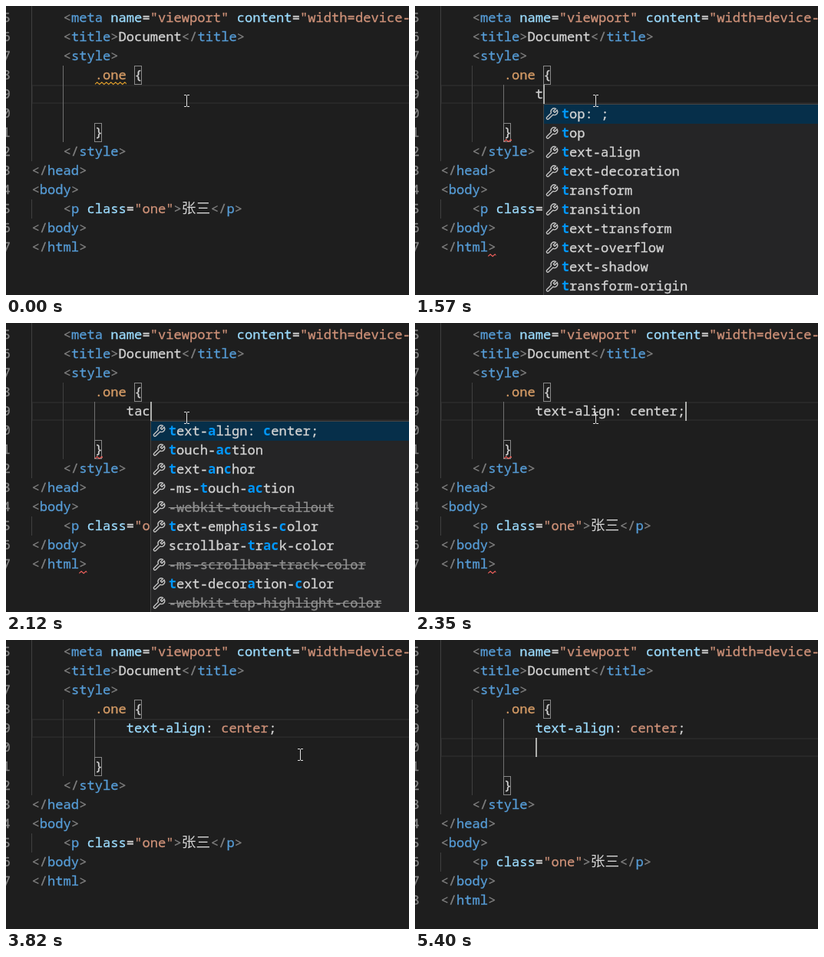
An HTML page with a canvas for the animation above (5530 ms loop, 525 by 378 pixels).

```html
<!DOCTYPE html>
<html lang="en">
<head>
<meta charset="utf-8">
<title>Code editor</title>
<style>
  html, body { margin: 0; width: 100%; height: 100%; overflow: hidden; background: #1e1e1e; }
  canvas { display: block; }
</style>
</head>
<body>
<canvas id="stage" width="525" height="378"></canvas>
<script>
const ctx = document.getElementById('stage').getContext('2d');
const LOOP = 5530, W = 525, H = 378;
const CELL = 10.28, LEFT = 33.5, ROW = 25, FIRST = 5;
const MONO = '17.13px "Noto Sans Mono", monospace';
const CJK = '18.7px "Noto Sans CJK SC", "Noto Sans CJK", sans-serif';
const COLORS = {
  g: '#808080', b: '#569cd6', a: '#9cdcfe', s: '#ce9178', o: '#d69c66', w: '#d4d4d4', c: '#d4d4d4'
};

// A code line: parts separated by "|", one colour key per part
const HEAD = [
  ['    <|meta| name|=|"viewport"| content|=|"width=device-width"', 'gbawsaws'],
  ['    <|title|>|Document|</|title|>', 'gbgwgbg'],
  ['    <|style|>', 'gbg'],
  ['        .one| {', 'ow']
];
const TAIL = [
  ['        }', 'w'],
  ['    </|style|>', 'gbg'],
  ['</|head|>', 'gbg'],
  ['<|body|>', 'gbg'],
  ['    <|p| class|=|"one"|>|张三|</|p|>', 'gbawsgcgbg'],
  ['</|body|>', 'gbg'],
  ['</|html|>', 'gbg']
];

// Upper case marks matched letters, "~" marks deprecated entries
const LISTS = {
  t: ['Top: ;', 'Top', 'Text-align', 'Text-decoration', 'Transform', 'Transition',
    'Text-transform', 'Text-overflow', 'Text-shadow', 'Transform-origin'],
  ta: ['Text-Align: left;', 'TAble-layout', 'TAb-size', 'Text-Align', 'Text-Align-last',
    'Text-Anchor', 'Touch-Action', 'TrAnsform', 'TrAnsition', 'TrAnsform-origin'],
  tac: ['Text-Align: Center;', 'Touch-ACtion', 'Text-AnChor', '-ms-Touch-ACtion',
    '~-webkit-touch-callout', 'Text-emphAsis-Color', 'scrollbar-TrACk-color',
    '~-ms-scrollbar-track-color', 'Text-decorAtion-Color', '~-webkit-tap-highlight-color']
};

const WRENCH = new Path2D('M6.9 6.9A4 4 0 0 1 12.5 1.8L9.6 4.7L11.3 6.4L14.2 3.5' +
  'A4 4 0 0 1 9.1 9.1L3.8 14.3A1.4 1.4 0 0 1 1.7 12.2Z');

const colX = col => LEFT + col * CELL;
const rowY = n => 3 + (n - FIRST) * ROW;
const within = (t, from, to) => t >= from && t < to;

function rect(x, y, w, h, color) {
  ctx.fillStyle = color;
  ctx.fillRect(x, y, w, h);
}

// A hairline stroke gives the regular weight a little more body
function text(str, x, top, color, font = MONO) {
  ctx.font = font;
  ctx.fillStyle = ctx.strokeStyle = color;
  ctx.fillText(str, x, top + 18);
  if (font !== MONO) return;
  ctx.lineWidth = 0.3;
  ctx.strokeText(str, x, top + 18);
}

function codeLine([parts, keys], n) {
  let x = LEFT;
  parts.split('|').forEach((part, i) => {
    const wide = keys[i] === 'c';
    text(part, x, rowY(n), COLORS[keys[i]], wide ? CJK : MONO);
    x += part.length * (wide ? 19 : CELL);
  });
}

function squiggle(col, n, length, color) {
  const x0 = colX(col), end = length * CELL, y = rowY(n) + 24.4, half = 3;
  ctx.save();
  ctx.beginPath();
  ctx.rect(x0, y - 4, end, 6);
  ctx.clip();
  ctx.beginPath();
  for (let i = 0; i * half <= end + half; i++) ctx.lineTo(x0 + i * half, y - (i % 2 ? 2.6 : 0));
  ctx.strokeStyle = color;
  ctx.lineWidth = 1.1;
  ctx.stroke();
  ctx.restore();
}

function bracketBox(col, n) {
  ctx.strokeStyle = '#888';
  ctx.lineWidth = 1;
  ctx.strokeRect(Math.floor(colX(col) + 0.1) + 0.5, rowY(n) + 0.5, 9, 24);
}

function popup(list, x) {
  rect(x, 128, W, H, '#454545');
  rect(x + 1, 129, W, H, '#252526');
  rect(x + 1, 129, W, ROW, '#062f4a');
  list.forEach((entry, i) => {
    const top = 129 + i * ROW, old = entry[0] === '~', label = entry.replace('~', '');
    ctx.save();
    ctx.translate(x + 3, top + 3.5);
    ctx.scale(1.07, 1.07);
    ctx.strokeStyle = '#c5c5c5';
    ctx.lineWidth = 1.3;
    ctx.stroke(WRENCH);
    ctx.restore();
    const left = x + 23.7;
    [...label].forEach((ch, k) => {
      const hit = /[A-Z]/.test(ch);
      text(ch.toLowerCase(), left + k * CELL, top,
        hit ? '#0097fb' : old ? '#8f8f8f' : '#d4d4d4', hit ? 'bold ' + MONO : MONO);
    });
    if (old) rect(left, top + 12, label.length * CELL, 1, '#8f8f8f');
  });
}

function pointer(x, y) {
  const color = '#e0e0e0';
  rect(x, y - 7, 1, 14, color);
  for (const end of [-8, 7]) {
    rect(x - 3, y + end, 3, 1, color);
    rect(x + 1, y + end, 3, 1, color);
  }
}

function pointerAt(t) {
  if (t >= 5080) return null;
  if (t >= 5000) return [518, 225];
  if (t >= 4920) return [444, 182];
  const step = t < 3510 ? 0 : Math.min(5, 1 + Math.floor((t - 3510) / 77.5));
  const k = step / 5, ease = k * k * (3 - 2 * k);
  return [Math.round(235 + 148 * ease), Math.round(124 + 26 * ease)];
}

function typedAt(t) {
  if (t < 550) return '';
  if (t < 1890) return 't';
  if (t < 2120) return 'ta';
  return t < 2350 ? 'tac' : 'text-align: center;';
}

function draw(t) {
  const typed = typedAt(t), started = t >= 550, entered = t >= 4370;
  const added = entered ? 1 : 0, line = 9 + added, close = 11 + added;
  const caretCol = 12 + (entered ? 0 : typed.length);

  rect(0, 0, W, H, '#1e1e1e');
  ctx.strokeStyle = '#282828';
  ctx.lineWidth = 2;
  ctx.strokeRect(34, rowY(line) + 1, 600, 23);

  // indent guides
  rect(33, 0, 1, rowY(close + 2), '#404040');
  rect(33, rowY(close + 4), 1, ROW, '#404040');
  rect(74, 78, 1, rowY(close + 1) - 78, started ? '#404040' : '#707070');
  if (started) rect(115, 103, 1, rowY(close) - 103, '#707070');

  bracketBox(13, 8);
  bracketBox(8, close);

  for (let n = FIRST; n <= close + 6; n++) text(String(n % 10), -4.6, rowY(n), '#858585');
  HEAD.forEach((l, i) => codeLine(l, FIRST + i));
  TAIL.forEach((l, i) => codeLine(l, close + i));
  if (t < 2440) text(typed, colX(12), rowY(9), COLORS.w);
  else codeLine(['            text-align|: |center|;', 'awsw'], 9);

  if (t < 1100) squiggle(8, 8, 4, '#d99a2b');
  if (within(t, 1100, 2900)) {
    squiggle(8, 11, 1, '#f1605c');
    squiggle(6, 17, 1, '#f1605c');
  }

  const caretOn = within(t, 70, 1100) || within(t, 1570, 2900) || within(t, 3360, 3820) ||
    within(t, 4370, 4920) || t >= 5400;
  const caretX = Math.round(colX(caretCol));
  if (within(t, 780, 2350)) popup(LISTS[typed], caretX);
  if (caretOn) rect(caretX, rowY(line), 2, ROW, '#aeafad');

  const p = pointerAt(t);
  if (p) pointer(...p);
}

const start = performance.now();
function tick() {
  draw((performance.now() - start) % LOOP);
  requestAnimationFrame(tick);
}
tick();
</script>
</body>
</html>
```
